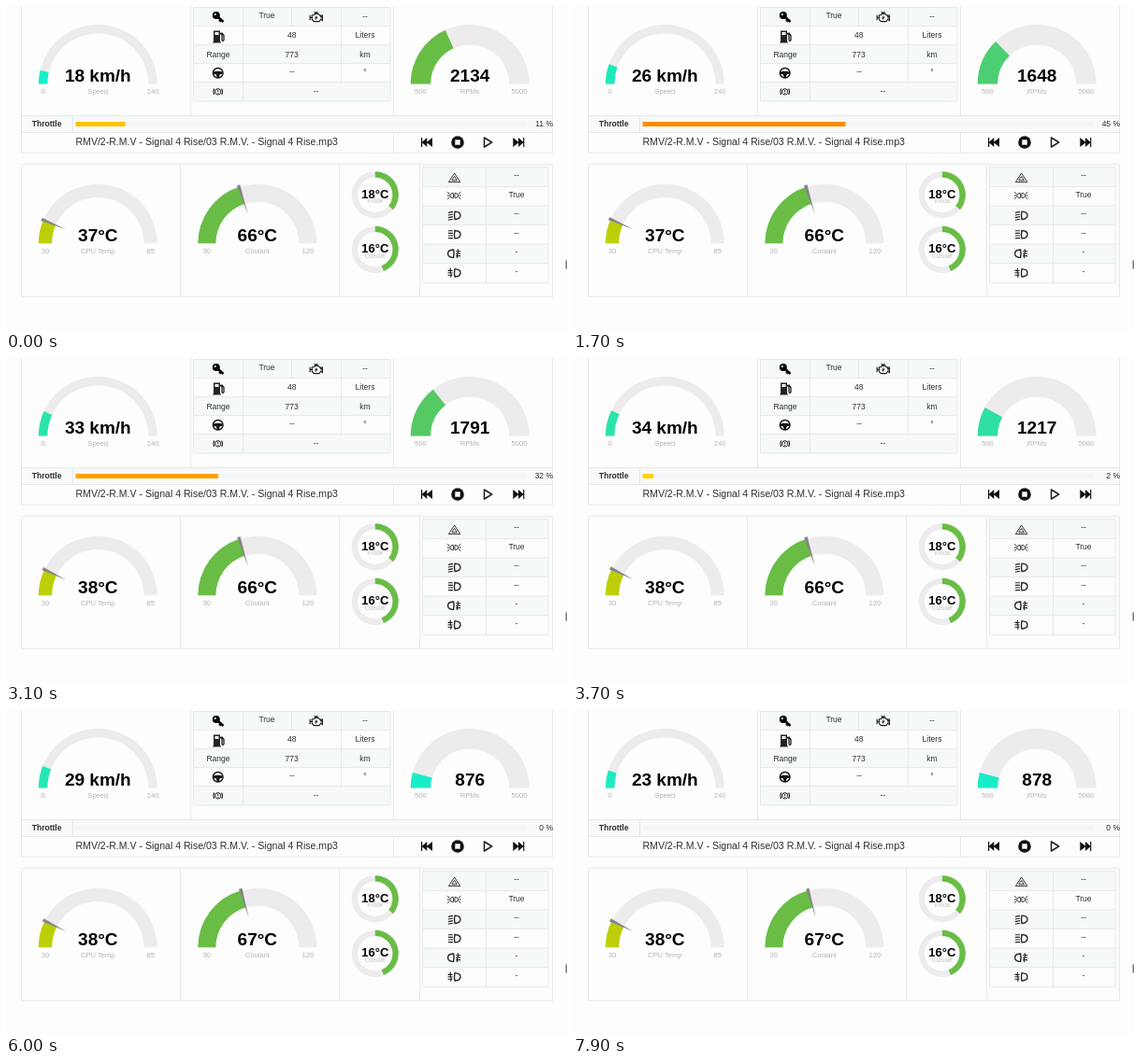
Recreate the animation shown at these times as an HTML page. Size 600 by 347 pixels, loop 8000 ms.

```html
<!DOCTYPE html>
<html lang="en">
<head>
<meta charset="utf-8">
<title>Car dashboard</title>
<style>
html, body { margin: 0; height: 100%; overflow: hidden; background: #fefdfe; }
svg { display: block; width: 600px; height: 347px; }
text { font-family: "Liberation Sans", Arial, sans-serif; font-size: 8.5px; fill: #2b2f33; text-anchor: middle; }
.big { font-weight: bold; font-size: 19px; fill: #000; }
.mid { font-weight: bold; font-size: 13px; fill: #000; }
.label { font-size: 7.6px; fill: #b3b3b3; }
.tiny { font-size: 6.4px; fill: #c4c4c4; }
.grid { fill: none; stroke: #e6e8ea; }
.line { fill: none; stroke: #222; stroke-width: 1.1; }
</style>
</head>
<body>
<svg id="stage" viewBox="0 0 600 347"></svg>
<script>
const LOOP = 8000, STEP = 100;
const RING = '#edebeb', GREEN = '#69bd45';
const stage = document.getElementById('stage');

// [time, value] points, joined by straight lines
const tracks = {
  speed: [[0, 18], [900, 22], [1700, 26], [2500, 31], [3400, 34], [3700, 34], [4500, 32], [6000, 29], [6500, 28.6], [7400, 23.2], [8000, 22.8]],
  rpm: [[0, 2134], [600, 1450], [1000, 1440], [1700, 1648], [2500, 1888], [2700, 1800], [3600, 1780], [3700, 1217], [4500, 1125], [5400, 960], [6000, 876], [6800, 884], [7900, 878]],
  throttle: [[0, 11], [1200, 45], [1700, 45], [2500, 36], [3600, 28], [3700, 2.4], [4300, 0]],
  cpu: [[0, 37.1], [1700, 37.3], [2500, 37.55], [3400, 38.1]],
  coolant: [[0, 66], [4500, 66.2], [5500, 67]]
};

function valueAt(track, t) {
  const i = track.findIndex(p => p[0] > t);
  if (i < 0) return track[track.length - 1][1];
  const [t0, a] = track[i - 1], [t1, b] = track[i];
  return a + (b - a) * (t - t0) / (t1 - t0);
}

const text = (x, y, s, cls = '', more = '') => `<text x="${x}" y="${y}" class="${cls}" ${more}>${s}</text>`;
const rect = (x, y, w, h, fill) => `<rect x="${x}" y="${y}" width="${w}" height="${h}" fill="${fill}"/>`;
const path = (d, fill) => `<path d="${d}" fill="${fill}"/>`;
const icon = (x, y, body, scale = 1) => `<g transform="translate(${x} ${y}) scale(${scale})">${body}</g>`;
const stroke = (d, more = '') => `<path class="line" d="${d}" ${more}/>`;

// Band between two radii; angles in turns, clockwise from the left
function band(cx, cy, ro, ri, from, to) {
  const at = (r, a) => `${(cx - r * Math.cos(a * 2 * Math.PI)).toFixed(2)} ${(cy - r * Math.sin(a * 2 * Math.PI)).toFixed(2)}`;
  const large = to - from > 0.5 ? 1 : 0;
  return `M${at(ro, from)}A${ro} ${ro} 0 ${large} 1 ${at(ro, to)}L${at(ri, to)}A${ri} ${ri} 0 ${large} 0 ${at(ri, from)}Z`;
}

function coolColor(p) {
  const k = Math.min(1, p / 0.35), mix = (a, b) => Math.round(a + (b - a) * k);
  return `rgb(${mix(0, 104)},${mix(252, 190)},${mix(240, 68)})`;
}

function gauge(g, value) {
  const { x, y, min, max, width, name, unit } = g, R = 63.5, ri = R - width;
  const p = (value - min) / (max - min);
  let out = path(band(x, y, R, ri, 0, 0.5), RING) + path(band(x, y, R, ri, 0, p / 2), g.color || coolColor(p));
  if (g.pointer) {
    out += `<path d="M${x - ri + 11.5} ${y}L${x - R - 2} ${y - 1.8}v3.6Z" fill="#858587" transform="rotate(${p * 180} ${x} ${y})"/>`;
  }
  return out + text(x, y - 2.3, Math.round(value) + unit, 'big') + text(x, y + 10.6, name, 'label')
    + text(x - R + width / 2, y + 10.6, min, 'label') + text(x + R - width / 2, y + 10.6, max, 'label');
}

function donut(y, p, value, name) {
  const x = 394.8, ring = (to, fill) => path(band(x, y, 25, 18.7, 0.25, 0.25 + to), fill);
  return ring(0.9999, RING) + ring(p, GREEN) + text(x, y + 8.7, name, 'tiny') + text(x, y + 3.4, value + '°C', 'mid');
}

const gauges = {
  speed: { x: 98.3, y: 83.5, min: 0, max: 240, width: 9.5, name: 'Speed', unit: ' km/h' },
  rpm: { x: 496.2, y: 83.5, min: 500, max: 5000, width: 21.4, name: 'RPMs', unit: '' },
  cpu: { x: 98.3, y: 254.2, min: 30, max: 85, width: 14.3, name: 'CPU Temp', unit: '°C', color: '#bccf06', pointer: true },
  coolant: { x: 268.8, y: 254.2, min: 30, max: 120, width: 19, name: 'Coolant', unit: '°C', color: GREEN, pointer: true }
};

const bold = 'style="stroke-width:1.35"';
const lampD = stroke('M1-4.2Q7-4 7 0T1 4.2Q0 0 1-4.2Z', bold);
const beams = dy => stroke([-3.9, -1.3, 1.3, 3.9].map(y => `M-6 ${y + dy}L-1 ${y}`).join(''));
const fog = lampD + stroke('M-6.5-2.4h5M-6.5 0h5M-6.5 2.4h5M-3.4-5q-1.3 2.5 0 5t0 5');
const skip = path('M-6-5h1.2v4.4L.3-5v4.4L6-5V5L.3 .6V5l-5.1-4.4V5H-6Z', '#111');
const sideLamp = stroke('M1-2.8Q4.5-2 4.5 0T1 2.8Q.2 0 1-2.8ZM4.6-1.8l2.6-1.8M5 0h2.4M4.6 1.8l2.6 1.8', 'style="stroke-width:.9"');

const icons = [
  icon(227, 12, '<circle cx="-2.2" cy="-2" r="4"/><path d="M0 0L5.5 5M2.5 3l-1.3 1.6" stroke="#000" stroke-width="2.6"/><circle cx="-3.2" cy="-3" r="1.1" fill="#fff"/>'),
  icon(331.6, 12.3, stroke('M-5-3h2.5l1-1.5h4.5l1.5 2h1.5v2H7.5V-2.5H8V4H7.5V2H6L4 5H-2.5L-5 2.5ZM-7.5-3V3.5M-7.5 0H-5M-2.5-6.3h5M0-6.3v2', bold) + path('M1.2-3L-2 1H0L-1 4 2.5-.5H.5Z', '#222'), 0.86),
  icon(227, 32.5, path('M-5-6H2V6H3V7H-6V6H-5Z', '#222') + rect(-3.5, -4.5, 4, 3, '#fff') + stroke('M2-3.5l2 2V4q1 2 2 0V-1L3.5-4', bold)),
  icon(226.7, 71.8, '<circle r="5.3" fill="none" stroke="#111" stroke-width="1.5"/><path d="M-5-1Q0-3 5-1V1L2 1.5 1 5H-1L-2 1.5-5 1Z" fill="#111"/>'),
  icon(226.7, 91.8, '<circle r="3.4" class="line"/>' + stroke('M-4.3-3.5Q-6.3 0-4.3 3.5M4.3-3.5Q6.3 0 4.3 3.5M0-2V.6M0 1.3V2.3'), 0.92),
  icon(450, 146, skip),
  icon(483, 146, '<circle r="6.8" fill="#111"/>' + rect(-2.7, -2.7, 5.4, 5.4, '#fff')),
  icon(515.5, 146, stroke('M-4-5L4.2 0-4 5Z', 'style="stroke-width:1.5;stroke-linejoin:round"')),
  icon(548.3, 146, skip, '-1 1'),
  icon(479.6, 184, stroke('M0-5L6.2 4.6H-6.2ZM0-1.6L2.8 2.8H-2.8Z', 'style="stroke-width:.9"')),
  icon(479.2, 203, sideLamp),
  icon(479.2, 203, sideLamp, '-1 1'),
  icon(479, 224.3, lampD + beams(1)),
  icon(479, 244.7, lampD + beams(0)),
  icon(479.6, 265.2, fog, '-1 1'),
  icon(479, 285.8, fog)
].join('');

function staticPart() {
  let out = rect(16, 117, 568, 18.5, '#f7f9fa');
  for (const y of [1.5, 41.5, 81.8]) out += rect(200.5, y, 210.5, 20, '#f5f9fa');
  for (const y of [172.5, 213.8, 255]) out += rect(445.5, y, 134.5, 20.5, '#f5f9fa');
  out += '<path class="grid" d="M16.5 0V157.5H584.5V0M197.5 0V117M414.5 0V117M16.5 117.5H584.5M16.5 135.5H584.5M71.5 117V135M414.5 135V157'
    + 'M16.5 169.5H584.5V311.5H16.5ZM186.5 169V311M356.5 169V311M442.5 169V311'
    + 'M200.5 1.5H411V102H200.5ZM200.5 21.5H411M200.5 41.5H411M200.5 61.5H411M200.5 81.5H411M253.5 1V102M305.5 1V21M358.5 1V81'
    + 'M445.5 172.5H580V296.5H445.5ZM445.5 193.5H580M445.5 214H580M445.5 234.5H580M445.5 255H580M445.5 275.5H580M513.5 172V296"/>';
  const cells = [[279, 13.2, 'True'], [384, 13.5, '--'], [305.7, 34, '48'], [384, 34, 'Liters'], [227, 54.6, 'Range'],
    [305.7, 54.6, '773'], [384, 54.6, 'km'], [306, 73, '--'], [384, 74, '°'], [331.5, 94, '--']];
  ['--', 'True', '--', '--', '-', '-'].forEach((s, i) => cells.push([546, 184.4 + i * 20.5, s]));
  for (const c of cells) out += text(...c);
  out += text(43.6, 128.7, 'Throttle', '', 'style="font-weight:bold"')
    + text(74.5, 148.6, 'RMV/2-R.M.V - Signal 4 Rise/03 R.M.V. - Signal 4 Rise.mp3', '', 'style="text-anchor:start;font-size:10.55px"')
    + rect(74.5, 124, 482, 5, '#f3f5f6')
    + donut(202.2, 0.36, 18, 'Inside') + donut(260.8, 0.44, 16, 'Outside');
  return out + icons + rect(598.5, 272.5, 1.5, 9, '#777');
}

stage.innerHTML = staticPart() + '<g id="live"></g>';
const live = document.getElementById('live');

function draw(now) {
  const t = Math.floor(now % LOOP / STEP) * STEP;
  const throttle = valueAt(tracks.throttle, t);
  let out = rect(74.5, 124, 4.82 * throttle, 5, `rgb(255,${Math.round(213 - 1.6 * throttle)},0)`)
    + text(585, 128.8, Math.round(throttle) + ' %', '', 'style="text-anchor:end"');
  for (const key in gauges) out += gauge(gauges[key], valueAt(tracks[key], t));
  live.innerHTML = out;
}

const start = performance.now();
function tick() {
  draw(performance.now() - start);
  requestAnimationFrame(tick);
}
tick();
</script>
</body>
</html>
```
